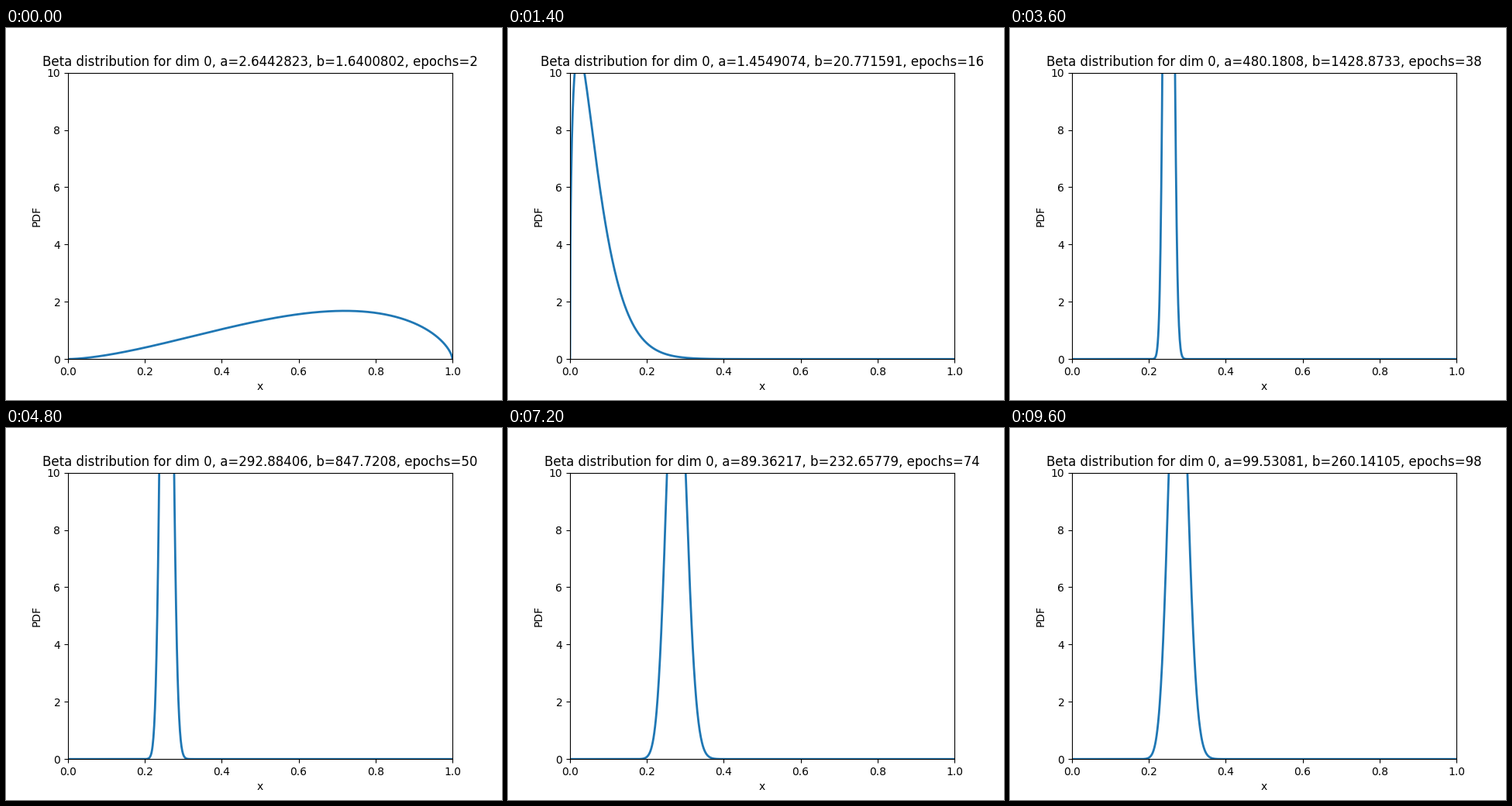
Write a matplotlib script that moves like this. It is 640 px wide and 480 px high and loops after 9800 ms.

```python
import math

import matplotlib.pyplot as plt
import numpy as np
from matplotlib.animation import FuncAnimation

FRAMES = 49
INTERVAL = 200

# Known training states: epoch, a, b
STATES = np.array([
    (2, 2.6442823, 1.6400802),
    (16, 1.4549074, 20.771591),
    (38, 480.1808, 1428.8733),
    (50, 292.88406, 847.7208),
    (64, 86.29644, 225.30954),
    (84, 92.536804, 240.24571),
    (98, 99.53081, 260.14105),
])

x = np.linspace(0, 1, 1000)
with np.errstate(divide="ignore"):
    LOG_X = np.log(x)
    LOG_REST = np.log1p(-x)


def beta_pdf(a, b):
    log_norm = math.lgamma(a + b) - math.lgamma(a) - math.lgamma(b)
    return np.exp(log_norm + (a - 1) * LOG_X + (b - 1) * LOG_REST)


def params(epoch):
    """Interpolate a and b on a log scale, in single precision."""
    epochs, *columns = STATES.T
    return [np.float32(np.exp(np.interp(epoch, epochs, np.log(c))))
            for c in columns]


fig, ax = plt.subplots(figsize=(6.4, 4.8), dpi=100)
line, = ax.plot([], [], lw=2, color="#1f77b4")
ax.set(xlim=(0, 1), ylim=(0, 10), xlabel="x", ylabel="PDF")
title = ax.set_title("")


def update(i):
    epoch = 2 * (i + 1)
    a, b = params(epoch)
    line.set_data(x, beta_pdf(float(a), float(b)))
    title.set_text(f"Beta distribution for dim 0, a={a!s}, b={b!s}, "
                   f"epochs={epoch}")
    return line, title


anim = FuncAnimation(fig, update, frames=FRAMES, interval=INTERVAL,
                     repeat=True, repeat_delay=0)
plt.show()
```
